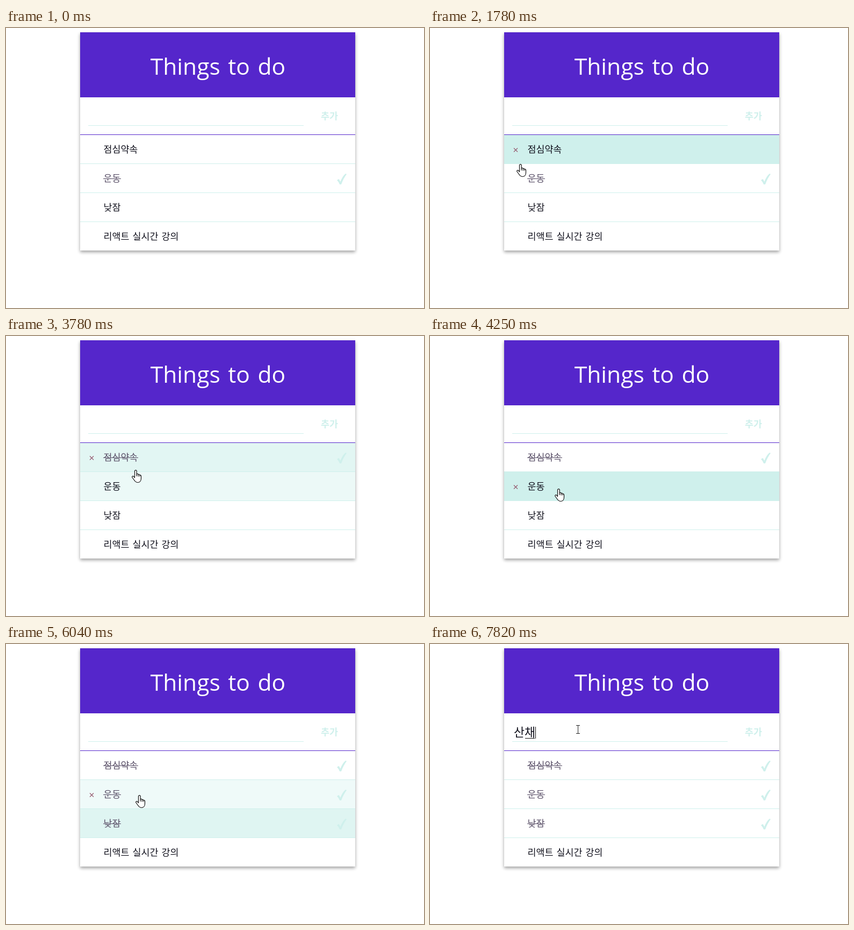
Animation of 778x521 px, one loop 8000 ms. Source, as an HTML page:

```html
<!DOCTYPE html>
<html lang="ko">
<head>
<meta charset="utf-8">
<title>Things to do</title>
<style>
  html, body { margin: 0; width: 100%; height: 100%; overflow: hidden; background: #fff; }
  .card {
    position: absolute; left: 138px; top: 8px; width: 512px; height: 406px; background: #fff;
    box-shadow: 0 3px 6px rgba(0,0,0,.16), 0 3px 6px rgba(0,0,0,.23);
  }
  svg { position: absolute; left: 0; top: 0; }
  text {
    font: 300 17.35px "Noto Sans CJK KR", "Noto Sans CJK", sans-serif;
    word-spacing: 1.3px; white-space: pre; fill: #10101c;
  }
  .title { font: 42.5px "Open Sans", "Noto Sans", sans-serif; word-spacing: 3.5px; fill: #fff; }
  .add { font-weight: 700; fill: #cff0ec; }
  .typed { font-size: 21.7px; }
  .purple { fill: #5526cb; }
  .mint, .bg, .check { fill: #cff0ec; }
  .done text, .strike { fill: #5a5068; }
  .strike, .check { visibility: hidden; }
  .done .strike, .done .check { visibility: visible; }
  .remove { fill: none; stroke: #965a70; stroke-width: 1.2; }
</style>
</head>
<body>
<div class="card"></div>
<svg width="778" height="521" viewBox="0 0 778 521">
  <rect class="purple" x="138" y="8" width="512" height="121"/>
  <text class="title" x="394.5" y="87" text-anchor="middle">Things to do</text>
  <rect class="mint" x="153" y="181" width="401" height="1"/>
  <text class="add" x="586" y="170">추가</text>
  <rect class="purple" x="138" y="198" width="512" height="1"/>
  <g id="rows"></g>
  <text class="typed" id="typed" x="156" y="172"></text>
  <rect id="underline" y="175" width="18" height="1" fill="#111"/>
  <rect id="caret" y="154" width="1" height="22" fill="#111"/>
  <g id="hand" stroke="#111" stroke-width="1.2" stroke-linejoin="round">
    <path fill="#fff" d="M5.5 14.5V2.6C5.5 0 9.2 0 9.2 2.6V8C9.8 7 12 7.2 12.2 8.8C13 8 15 8.4 15 10C16 9.2 17.6 10 17.5 11.6V16C17.5 20.5 15 23.5 11.5 23.5C7.5 23.5 6 21.5 4.5 19L.9 14C0 12 2.5 11 3.6 12.4Z"/>
    <path fill="none" d="M9.2 8v4M12.2 9v3.5M15 10v2.5"/>
  </g>
  <path id="beam" d="M-3 -7.5H4M-3 7.5H4M.5 -7.5V7.5" fill="none" stroke="#222"/>
</svg>
<script>
const LOOP = 8000, FADE = 150, BLINK = 530;
const LIST_TOP = 199, ROW = 54, LEFT = 138, RIGHT = 650;
const $ = id => document.getElementById(id);
const show = (el, on) => el.style.visibility = on ? 'visible' : 'hidden';
const easeOut = p => 1 - (1 - p) ** 2;

const items = [
  { label: '점심약속', clicks: [2450] },
  { label: '운동', done: true, clicks: [3650, 4920] },
  { label: '낮잠', clicks: [5780] },
  { label: '리액트 실시간 강의', clicks: [] }
];

const start = { x: 692, y: 505 };
const moves = [
  { at: 120, ms: 800, x: 212, y: 226 },
  { at: 990, ms: 200, x: 164, y: 222 },
  { at: 1590, ms: 190, x: 168, y: 253 },
  { at: 1850, ms: 160, x: 195, y: 268 },
  { at: 2020, ms: 290, x: 243, y: 240 },
  { at: 2700, ms: 210, x: 243, y: 254 },
  { at: 3700, ms: 150, x: 241, y: 248 },
  { at: 3900, ms: 350, x: 239, y: 284 },
  { at: 4310, ms: 140, x: 239, y: 301 },
  { at: 4520, ms: 260, x: 239, y: 273 },
  { at: 5020, ms: 290, x: 239, y: 323 },
  { at: 5970, ms: 520, x: 275, y: 159 }
];

// the input is focused first, then each key press changes its text
const keys = [
  { at: 6510, text: '' }, { at: 6760, text: 'ㅅ' }, { at: 7560, text: '사' },
  { at: 7620, text: '산' }, { at: 7760, text: '산ㅊ' }, { at: 7820, text: '산채' }
];

const strikeWidth = label => 16 * label.length + (label.includes(' ') ? -21 : 1);

$('rows').innerHTML = items.map(({ label }, i) => `
  <g transform="translate(${LEFT} ${LIST_TOP + ROW * i})">
    <rect class="bg" width="512" height="${ROW}"/>
    ${i < items.length - 1 ? '<rect class="mint" y="53" width="512" height="1"/>' : ''}
    <path class="remove" d="M18 24.5l7 7m0 -7l-7 7"/>
    <text x="43.5" y="33">${label}</text>
    <rect class="strike" x="43" y="27" width="${strikeWidth(label)}" height="1"/>
    <path class="check" transform="translate(478 18)" d="M0 12L3.5 10Q5 12 6.3 15Q10 5 16 0L18 1Q12 9 8 20H5Q3 15 0 12Z"/>
  </g>`).join('');
const rows = [...$('rows').children];

function pointer(t) {
  let { x, y } = start;
  for (const move of moves) {
    if (t < move.at) break;
    const k = easeOut(Math.min(1, (t - move.at) / move.ms));
    x += (move.x - x) * k;
    y += (move.y - y) * k;
  }
  return { x, y };
}

function hoveredRow(t) {
  const { x, y } = pointer(t);
  return x > LEFT && x < RIGHT ? Math.floor((y - LIST_TOP - 1) / ROW) : -1;
}

// a linear fade is the share of the last FADE ms spent over the row
function highlight(i, t) {
  const samples = 15;
  let hits = 0;
  for (let s = 0; s < samples; s++) hits += hoveredRow(t - FADE * s / samples) === i;
  return hits / samples;
}

function drawRow(row, i, t) {
  const { done = false, clicks } = items[i];
  const odd = clicks.filter(c => c <= t).length % 2 === 1;
  row.classList.toggle('done', done !== odd);
  row.querySelector('.bg').style.opacity = highlight(i, t);
  show(row.querySelector('.remove'), hoveredRow(t) === i);
}

function drawInput(t) {
  const key = keys.filter(k => k.at <= t).pop();
  const text = key ? key.text : '';
  const end = 156 + 20 * text.length;
  $('typed').textContent = text;
  $('caret').setAttribute('x', end);
  $('underline').setAttribute('x', end - 19);
  show($('caret'), key && Math.floor((t - key.at) / BLINK) % 2 === 0);
  show($('underline'), text);
}

function drawPointer(t) {
  const { x, y } = pointer(t), overInput = y < LIST_TOP;
  $('hand').setAttribute('transform', `translate(${Math.round(x) - 7} ${Math.round(y)})`);
  $('beam').setAttribute('transform', `translate(${Math.round(x)} ${Math.round(y)})`);
  show($('hand'), t >= moves[0].at && !overInput);
  show($('beam'), overInput);
}

function frame(now) {
  const t = now % LOOP;
  rows.forEach((row, i) => drawRow(row, i, t));
  drawInput(t);
  drawPointer(t);
  requestAnimationFrame(frame);
}
frame(0);
</script>
</body>
</html>
```
